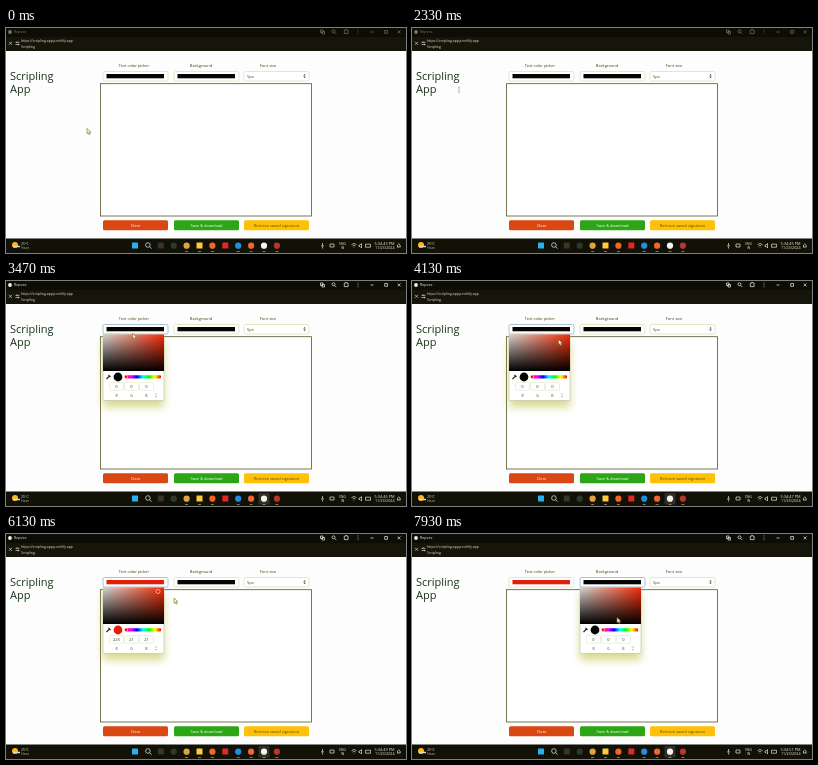
Recreate the animation shown at these times as an HTML page. Size 400x225 px, loop 8000 ms.

```html
<!DOCTYPE html>
<html lang="en">
<head>
<meta charset="utf-8">
<title>Scripling App</title>
<style>
  html, body { margin: 0; width: 100%; height: 100%; overflow: hidden; background: #fdfdfd; }
  svg { display: block; width: 100%; height: 100%; }
  text { font: 4px "Open Sans", "Noto Sans", sans-serif; }
  .mid { text-anchor: middle; }
  .end { text-anchor: end; }
  .line { fill: none; stroke-width: .7; }
</style>
</head>
<body>
<svg viewBox="0 0 400 225" preserveAspectRatio="none">
  <defs>
    <linearGradient id="red"><stop stop-color="#d4d4d0"/><stop offset="1" stop-color="#f52c08"/></linearGradient>
    <linearGradient id="dark" x2="0" y2="1"><stop stop-opacity="0"/><stop offset="1"/></linearGradient>
    <linearGradient id="hue"></linearGradient>
    <filter id="blur" x="-30%" y="-30%" width="160%" height="160%"><feGaussianBlur stdDeviation="4.5"/></filter>
  </defs>
  <rect width="400" height="225" fill="#fdfdfd"/>

  <rect width="400" height="23" fill="#151509"/>
  <rect width="400" height="9" fill="#0d0d05"/>
  <g id="titlebar">
    <circle cx="4" cy="4" r="1.9" fill="currentColor"/>
    <text x="8" y="5.4" fill="currentColor" style="font-size:3.7px">Repvex</text>
    <g class="line" stroke="currentColor">
      <path d="M314.500 2h2.500v2.500h-2.500zM316 3.500h2.500v2.500h-2.500z"/>
      <circle cx="327.500" cy="3.300" r="1.500"/><path d="M328.600 4.400l1.700 1.700"/>
      <path d="M338.300 2.200h1.200v-.7h1.400v.7h1.200v3.400h-3.800z"/>
      <path d="M352 1.500v.8M352 3.400v.8M352 5.300v.8M364.500 4h3M378.700 2.500h2.800v2.800h-2.800zM391.700 2.500l2.800 2.800M394.500 2.500l-2.800 2.800"/>
    </g>
  </g>
  <g class="line" stroke="#d8d8cc">
    <path d="M3 13.800l3 3M6 13.800l-3 3M9.500 14.300h4M9.500 16.500h4M11 13.500v1.600M12.500 15.700v1.600"/>
  </g>
  <g fill="#e2e2d2">
    <text x="15" y="14.300" style="font-size:3.400px">https://scripling-appjs.netlify.app</text>
    <text x="15" y="20" style="font-size:3.500px">Scripling</text>
  </g>

  <g fill="#173317">
    <text x="4" y="52.300" style="font-size:11px">Scripling</text>
    <text x="4" y="65.300" style="font-size:11px">App</text>
  </g>
  <g class="mid" fill="#45450d">
    <text x="128" y="39">Text color picker</text>
    <text x="195" y="39">Background</text>
    <text x="262" y="39">Font size</text>
  </g>
  <rect x="94.500" y="55.700" width="211" height="132.300" fill="#fff" stroke="#55552c" stroke-width=".8"/>
  <g id="fields"></g>
  <text x="241" y="49.700" fill="#45452a">5px</text>
  <path d="M297.300 47.600l1.200-1.700 1.200 1.700zM297.300 48.600l1.200 1.700 1.200-1.700z" fill="#444"/>
  <g id="buttons"></g>
  <g id="pickers"></g>

  <rect y="210.500" width="400" height="14.500" fill="#111107"/>
  <g id="taskbar"></g>
  <circle cx="9" cy="217" r="3" fill="#ffb51c"/>
  <path d="M7 218.500h7" stroke="#e3d9b8" stroke-width="1.500"/>
  <g fill="#eeeedd">
    <text x="15" y="217" style="font-size:3.500px">25°C</text>
    <text x="15" y="221.300" style="font-size:3.500px" fill="#b5b596">Haze</text>
    <text class="mid" x="336.500" y="217" style="font-size:3.300px">ENG</text>
    <text class="mid" x="336.500" y="221.300" style="font-size:3.300px">IN</text>
    <text class="end" id="clock" x="388.500" y="217" style="font-size:3.900px"></text>
    <text class="end" x="388.500" y="221.300" style="font-size:3.700px">11/23/2024</text>
  </g>
  <g class="line" stroke="#e4e4d5">
    <path d="M316.500 215v3M315 217.500q1.500 2.500 3 0M316.500 219v1.500M324 216h4v3h-4zM345.500 216.700q2.500-2.500 5 0M346.700 218q1.300-1.300 2.600 0M348 219.300v.5M353 217h1l1.500-1.500v4.500l-1.500-1.500h-1zM359.500 216.200h5v3h-5zM391 219h3.500M391.500 219v-2q1.300-2.500 2.600 0v2"/>
  </g>
  <path id="beam" d="M0 0h1.600M0 5h1.600M.8 0v5" fill="none" stroke="#777760" stroke-width=".5"/>
  <path id="arrow" d="M0 0v5.200l1.200-1 .9 1.900 1-.5-.9-1.800h1.700z" fill="#fffff0" stroke="#6b6b08" stroke-width=".6"/>
</svg>
<script>
const LOOP = 8000;
const $ = id => document.getElementById(id);
const BLACK = '#050503', RED = '#e11f0b';

$('hue').innerHTML = ['#f00', '#f0f', '#00f', '#0ff', '#0f0', '#ff0', '#f00']
  .map((color, i) => `<stop offset="${i / 6}" stop-color="${color}"/>`).join('');

$('fields').innerHTML = [97, 168, 238].map((x, i) => `
  <rect id="box${i}" x="${x}" y="43.500" width="65" height="9.500" rx="1.500" fill="#fff" stroke="#dedeb0" stroke-width=".7"/>
  ${i < 2 ? `<rect id="bar${i}" x="${x + 3.5}" y="46" width="57.500" height="4.300"/>` : ''}`).join('');

$('buttons').innerHTML = [
  [97, 'Clear', '#d94712', '#fff'],
  [168, 'Save &amp; download', '#2ca516', '#fff'],
  [238, 'Retrieve saved signature', '#ffc107', '#5c4800']
].map(([x, label, fill, ink]) => `
  <rect x="${x}" y="192.300" width="65" height="10" rx="1.500" fill="${fill}"/>
  <text class="mid" x="${x + 32.5}" y="198.800" fill="${ink}">${label}</text>`).join('');

// One color picker popup; x is its left edge.
const picker = (x, i) => `<g id="picker${i}">
  <rect x="${x}" y="60" width="61" height="66" fill="#a9a900" opacity=".45" filter="url(#blur)"/>
  <rect x="${x}" y="53.500" width="61" height="66" rx="1" fill="#fff" stroke="#bcbcae" stroke-width=".6"/>
  <g id="content${i}">
    <rect x="${x}" y="53.500" width="61" height="36.500" fill="url(#red)"/>
    <rect x="${x}" y="53.500" width="61" height="36.500" fill="url(#dark)"/>
    <circle id="mark${i}" cx="${x + 55}" cy="57.500" r="2" fill="${RED}" stroke="#fff" stroke-width=".6"/>
    <path d="M${x + 3.5} 98l3-3M${x + 5.5} 94l2 2" stroke="#222" stroke-width="1.100"/>
    <circle id="swatch${i}" cx="${x + 15}" cy="96" r="4.400"/>
    <rect x="${x + 22}" y="94.200" width="36" height="3.200" rx="1" fill="url(#hue)"/>
    <circle cx="${x + 23}" cy="95.800" r="1.700" fill="#f00" stroke="#fff" stroke-width=".6"/>
    ${[...'RGB'].map((letter, k) => {
      const cx = x + 13.5 + 15 * k;
      return `<rect x="${cx - 7}" y="101.500" width="14" height="7.700" rx="1" fill="#fff" stroke="#dedebc" stroke-width=".5"/>
        <text class="mid" id="value${i}${k}" x="${cx}" y="106.900" fill="#333320"></text>
        <text class="mid" x="${cx}" y="116" fill="#44442c" style="font-size:3.500px">${letter}</text>`;
    }).join('')}
    <path d="M${x + 52} 113.700l.9-1.200.9 1.200M${x + 52} 115l.9 1.200.9-1.200" class="line" stroke="#666" style="stroke-width:.4"/>
  </g></g>`;
$('pickers').innerHTML = picker(97, 0) + picker(168, 1);

const appColors = ['#29aef0', '', '#35352c', '#2c3a2b', '#e0a53a', '#ffca3a', '#f2661f', '#e02828',
  '#1d8fdd', '#f0642d', '#f4f4ee', '#b8352a'];
$('taskbar').innerHTML = appColors.map((color, i) => {
  const x = 129 + 12.9 * i;
  if (i === 1) return `<g class="line" stroke="#eee"><circle cx="${x}" cy="217" r="2.300"/><path d="M${x + 1.7} 218.700l2 2"/></g>`;
  const square = [0, 2, 5, 7].includes(i);
  return (square
    ? `<rect x="${x - 3}" y="214.500" width="6" height="6" rx=".5" fill="${color}"/>`
    : `<circle cx="${x}" cy="217.700" r="3.100" fill="${color}"/>`) +
    (i > 3 && i !== 7 ? `<path d="M${x - 1.5} 223.500h3" stroke="#a8a88b" stroke-width=".7"/>` : '');
}).join('') + '<rect id="active" x="252.500" y="212" width="11" height="11.500" rx="1" fill="#fff" opacity=".13"/>';

// Pointer tip: time, x, y
const path = [
  [0, 81, 100.5], [770, 81, 100.5], [930, 64, 85], [1100, 64, 85], [1530, 24, 59], [1930, 9, 51],
  [2060, 4, 53], [2300, 40, 60], [2730, 126, 49], [2870, 126.5, 48], [3330, 126.5, 48],
  [3870, 127, 65], [4130, 146.5, 58.5], [4270, 151, 56], [4750, 151, 56], [4930, 144, 53],
  [5130, 150, 49], [5550, 150, 49], [6130, 168, 64], [6230, 168, 64], [6500, 187, 55],
  [6730, 198, 47.5], [7230, 198, 47.5], [7670, 188.5, 60], [7930, 205, 83.5], [8000, 205, 83.5]
];

function pointerAt(t) {
  const i = path.findIndex(p => p[0] > t);
  const [t0, x0, y0] = path[i - 1], [t1, x1, y1] = path[i];
  const k = (t - t0) / (t1 - t0);
  return [x0 + (x1 - x0) * k, y0 + (y1 - y0) * k];
}

const show = (id, on) => $(id).style.display = on ? '' : 'none';

function setColor(i, fill, values) {
  $('bar' + i).setAttribute('fill', fill);
  $('swatch' + i).setAttribute('fill', fill);
  values.forEach((v, k) => $(`value${i}${k}`).textContent = v);
}

function draw(t) {
  const focused = t >= 3070, picked = t >= 4530;
  const open = [t >= 3200 && t < 6870, t >= 6930];
  $('titlebar').style.color = focused ? '#f2f2e8' : '#777764';
  show('active', focused);
  setColor(0, picked ? RED : BLACK, picked ? [225, 21, 21] : [0, 0, 0]);
  setColor(1, BLACK, [0, 0, 0]);
  open.forEach((on, i) => {
    show('picker' + i, on);
    show('content' + i, t >= [3470, 7270][i]);
    show('mark' + i, i === 0 && picked);
    $('box' + i).setAttribute('stroke', on ? '#86a9c0' : '#dedeb0');
  });
  $('clock').textContent = `5:34:${43 + Math.floor((t + 270) / 1000)} PM`;

  const [x, y] = pointerAt(t);
  const overTitle = x < 53 && y < 68;
  show('arrow', !overTitle);
  show('beam', overTitle);
  $(overTitle ? 'beam' : 'arrow').setAttribute('transform', `translate(${x} ${y})`);
}

function frame() {
  draw(performance.now() % LOOP);
  requestAnimationFrame(frame);
}
frame();
</script>
</body>
</html>
```
